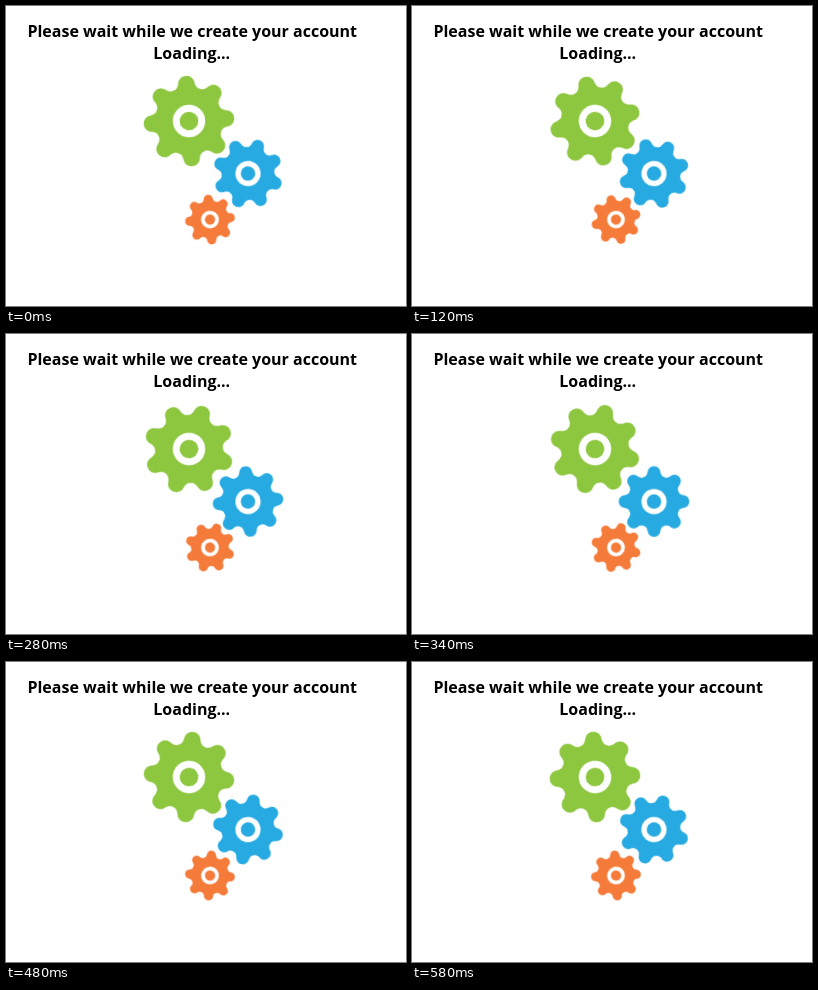
These frames come from a looping animation (400 px wide and 300 px high, 600 ms). An HTML page:

```html
<!DOCTYPE html>
<html lang="en">
<head>
<meta charset="utf-8">
<title>Loading</title>
<style>
  html, body { margin: 0; width: 100%; height: 100%; overflow: hidden; background: #fff; }
  svg { display: block; width: 400px; height: 300px; }
  text { font: bold 16px "Open Sans", sans-serif; fill: #000; text-anchor: middle; }
  .spin { animation: turn .6s steps(30) infinite; }
  .back { animation-direction: normal; --step: -45deg; }
  .fore { --step: 45deg; }
  @keyframes turn {
    from { transform: rotate(0deg); }
    to { transform: rotate(var(--step)); }
  }
</style>
</head>
<body>
<svg viewBox="0 0 400 300">
  <defs>
    <path id="tooth" d="M-13 -30.5C-9.5 -33 -8.6 -35.5 -8.1 -38.5C-7.4 -42.5 -4.3 -45.3 0 -45.3S7.4 -42.5 8.1 -38.5C8.6 -35.5 9.5 -33 13 -30.5Z"/>
    <g id="pair">
      <use href="#tooth"/>
      <use href="#tooth" transform="rotate(180)"/>
    </g>
    <g id="gear">
      <circle r="34"/>
      <use href="#pair"/>
      <use href="#pair" transform="rotate(45)"/>
      <use href="#pair" transform="rotate(90)"/>
      <use href="#pair" transform="rotate(135)"/>
      <circle r="16.2" fill="#fff"/>
      <circle r="9.3"/>
    </g>
  </defs>

  <text x="186.2" y="31">Please wait while we create your account</text>
  <text x="185.7" y="53">Loading...</text>

  <g transform="translate(183 115) rotate(-4)" fill="#8dc63f">
    <g class="spin back"><use href="#gear"/></g>
  </g>
  <g transform="translate(242 167.5) scale(.778) rotate(-25.5)" fill="#27aae1">
    <g class="spin fore"><use href="#gear"/></g>
  </g>
  <g transform="translate(204 213.5) scale(.55) rotate(-5)" fill="#f57b3b">
    <g class="spin back"><use href="#gear"/></g>
  </g>
</svg>
</body>
</html>
```
